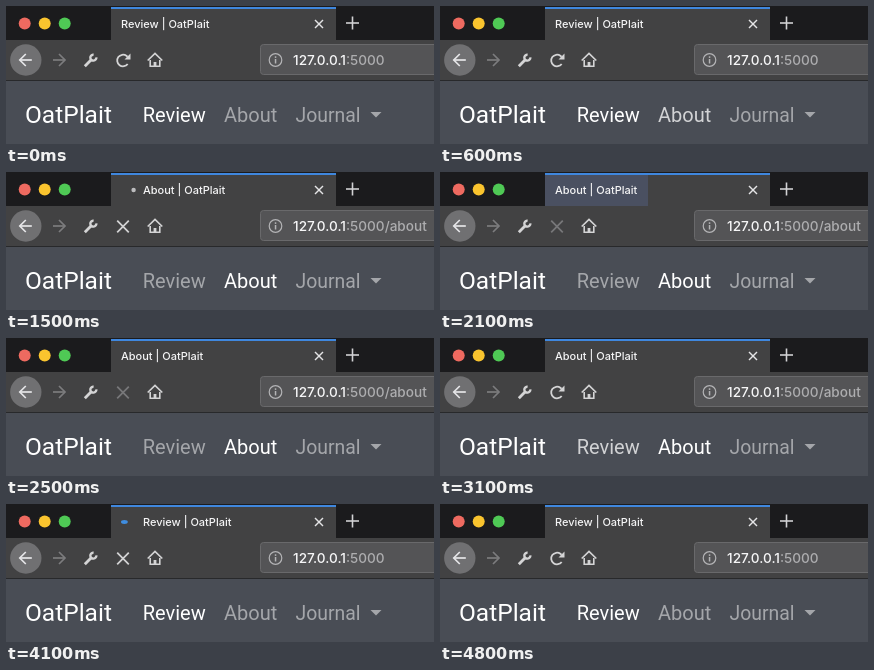
Animation, 428 px wide and 138 px high, one loop 4.9 s. Source, as an HTML page with a canvas:

```html
<!DOCTYPE html>
<html lang="en">
<head>
<meta charset="utf-8">
<title>Browser navigation</title>
<style>
html, body { margin: 0; width: 100%; height: 100%; overflow: hidden; background: #1b1b1d; }
canvas { display: block; width: 428px; height: 138px; }
</style>
</head>
<body>
<canvas id="stage"></canvas>
<script>
const W = 428, H = 138, LOOP = 4900, STEP = 100;
const BRAND = 'OatPlait';
const UI = 'Roboto, "Liberation Sans", sans-serif';
const TITLE_FONT = '500 11px Inter, "Liberation Sans", sans-serif';
const URL_FONT = '500 13.6px Inter, "Liberation Sans", sans-serif';
const BAR = '#424243', DARK = '#1b1b1d', ICON = '#d4d4d5';
const LINK = 0.5, HOVER = 0.75;

// start: click, commit: new page shown, done: loading ends
const LOADS = [
  { start: 1200, commit: 1400, done: 2000, ready: 2600 },
  { start: 3400, commit: 3600, done: 4200, ready: 4800 }
];

const canvas = document.getElementById('stage');
const ctx = canvas.getContext('2d');
const dpr = window.devicePixelRatio || 1;
canvas.width = W * dpr;
canvas.height = H * dpr;
ctx.scale(dpr, dpr);

const clamp = v => Math.max(0, Math.min(1, v));
const white = a => `rgba(255,255,255,${a})`;

function rect(x, y, w, h, color) {
  ctx.fillStyle = color;
  ctx.fillRect(x, y, w, h);
}

function text(str, x, y, font, color) {
  ctx.font = font;
  ctx.fillStyle = color;
  ctx.fillText(str, x, y);
  return x + ctx.measureText(str).width;
}

function oval(x, y, rx, ry, color) {
  ctx.fillStyle = color;
  ctx.beginPath();
  ctx.ellipse(x, y, rx, ry, 0, 0, Math.PI * 2);
  ctx.fill();
}

function ring(x, y, r, color, width) {
  ctx.strokeStyle = color;
  ctx.lineWidth = width;
  ctx.beginPath();
  ctx.arc(x, y, r, 0, Math.PI * 2);
  ctx.stroke();
}

function line(points, color, width) {
  ctx.strokeStyle = color;
  ctx.lineWidth = width;
  ctx.beginPath();
  points.forEach(([x, y], i) => i ? ctx.lineTo(x, y) : ctx.moveTo(x, y));
  ctx.stroke();
}

function shape(points, color) {
  ctx.fillStyle = color;
  ctx.beginPath();
  points.forEach(([x, y]) => ctx.lineTo(x, y));
  ctx.fill();
}

function cross(x, y, r, color, width) {
  line([[x - r, y - r], [x + r, y + r]], color, width);
  line([[x + r, y - r], [x - r, y + r]], color, width);
}

function arrow(x, y, dir, color) {
  line([[x - 6 * dir, y], [x + 6 * dir, y]], color, 1.7);
  line([[x, y - 6], [x + 6 * dir, y], [x, y + 6]], color, 1.7);
}

function wrench(x, y) {
  ctx.save();
  ctx.translate(x, y);
  ctx.rotate(Math.PI / 4);
  line([[0, -1], [0, 8]], ICON, 2.8);
  ctx.lineWidth = 2.4;
  ctx.beginPath();
  ctx.arc(0, -4, 3, -Math.PI * 0.28, Math.PI * 1.28);
  ctx.stroke();
  ctx.restore();
}

function reload(x, y) {
  ctx.strokeStyle = ICON;
  ctx.lineWidth = 1.8;
  ctx.beginPath();
  ctx.arc(x, y, 5.8, Math.PI * 0.2, Math.PI * 1.78);
  ctx.stroke();
  shape([[x + 7.5, y - 7], [x + 7.5, y - 1], [x + 1.5, y - 1]], ICON);
}

function home(x, y) {
  line([[x - 7.3, y + 0.5], [x, y - 6.5], [x + 7.3, y + 0.5]], ICON, 1.7);
  line([[x - 4.8, y], [x - 4.8, y + 6.3], [x + 4.8, y + 6.3], [x + 4.8, y]], ICON, 1.6);
  rect(x - 1.4, y + 2, 2.8, 4.5, ICON);
}

function throbber(load, t) {
  const angle = (t - load.start) / 800 * Math.PI * 2;
  const x = 123 - 6.5 * Math.cos(angle);
  if (load === LOADS[0]) oval(x, 18, 2.2, 2.2, '#bcbcbe');
  else oval(x, 18, 2.2 + 1.7 * Math.abs(Math.sin(angle)), 1.9, '#3f8de0');
}

function drawTabs(t, page, load) {
  rect(0, 0, W, 34, DARK);
  rect(105, 1, 225, 33, BAR);
  if (load && t >= load.done) {
    const p = clamp((t - load.done) / 400);
    rect(105, 3, Math.min(225, 412 * p), 31, `rgba(92,112,165,${0.4 * (1 - p)})`);
  }
  rect(105, 1, 225, 2, '#3f87de');
  ['#ee6a60', '#fac42e', '#4fc955'].forEach((c, i) => oval(18.7 + 20 * i, 17.5, 6, 6, c));

  const busy = load && t < load.done;
  if (busy) throbber(load, t);
  text(`${page} | ${BRAND}`, busy ? 137 : 115, 22, TITLE_FONT, '#f4f4f5');
  cross(313, 18, 4, '#e4e4e6', 1.5);
  line([[340, 17], [353, 17]], '#d2d2d4', 1.6);
  line([[346.5, 10.5], [346.5, 23.5]], '#d2d2d4', 1.6);
}

function drawToolbar(t, page, load) {
  rect(0, 34, W, 40, BAR);
  oval(19.8, 54, 15.7, 15.7, '#707072');
  arrow(19.8, 54, -1, '#e6e6e8');
  arrow(53, 54, 1, '#7c7c7e');
  wrench(84.5, 54.5);
  if (load && t < load.ready) {
    cross(117, 54.5, 5.8, t < load.done ? ICON : '#78787a', 1.7);
  } else {
    reload(117, 54.5);
  }
  home(149, 54);

  ctx.beginPath();
  ctx.roundRect(254.5, 38.5, 200, 30, 3);
  ctx.fillStyle = '#545456';
  ctx.fill();
  ctx.strokeStyle = '#69696b';
  ctx.lineWidth = 1;
  ctx.stroke();
  ring(269.5, 54, 6.3, '#b4b4b6', 1.2);
  rect(268.8, 53, 1.5, 4.5, '#b4b4b6');
  rect(268.8, 50.3, 1.5, 1.6, '#b4b4b6');
  const x = text('127.0.0.1', 287, 59, URL_FONT, '#f6f6f7');
  text(page === 'About' ? ':5000/about' : ':5000', x, 59, URL_FONT, '#adadaf');
}

function drawPage(t, page) {
  rect(0, 74, W, 64, '#494d55');
  rect(0, 74, W, 1, '#28292b');
  const lift = start => LINK + (HOVER - LINK) * clamp((t - start) / 200);
  const about = page === 'About' ? 1 : t < LOADS[0].commit ? lift(100) : LINK;
  const review = page === 'Review' ? 1 : lift(2500);
  const font = '20px ' + UI;
  text(BRAND, 19, 117, '24.5px ' + UI, '#fff');
  text('Review', 136.7, 116, font, white(review));
  text('About', 218, 116, font, white(about));
  text('Journal', 289.5, 116, '19.4px ' + UI, white(LINK));
  shape([[364.5, 106], [375.5, 106], [370, 111.5]], white(LINK));
}

function draw(t) {
  const load = LOADS.find(l => t >= l.start && t < l.ready);
  const page = t >= LOADS[0].commit && t < LOADS[1].commit ? 'About' : 'Review';
  ctx.clearRect(0, 0, W, H);
  drawTabs(t, page, load);
  drawToolbar(t, page, load);
  drawPage(t, page);
}

function tick() {
  const t = performance.now() % LOOP;
  draw(Math.floor(t / STEP) * STEP);
  requestAnimationFrame(tick);
}
tick();
</script>
</body>
</html>
```
